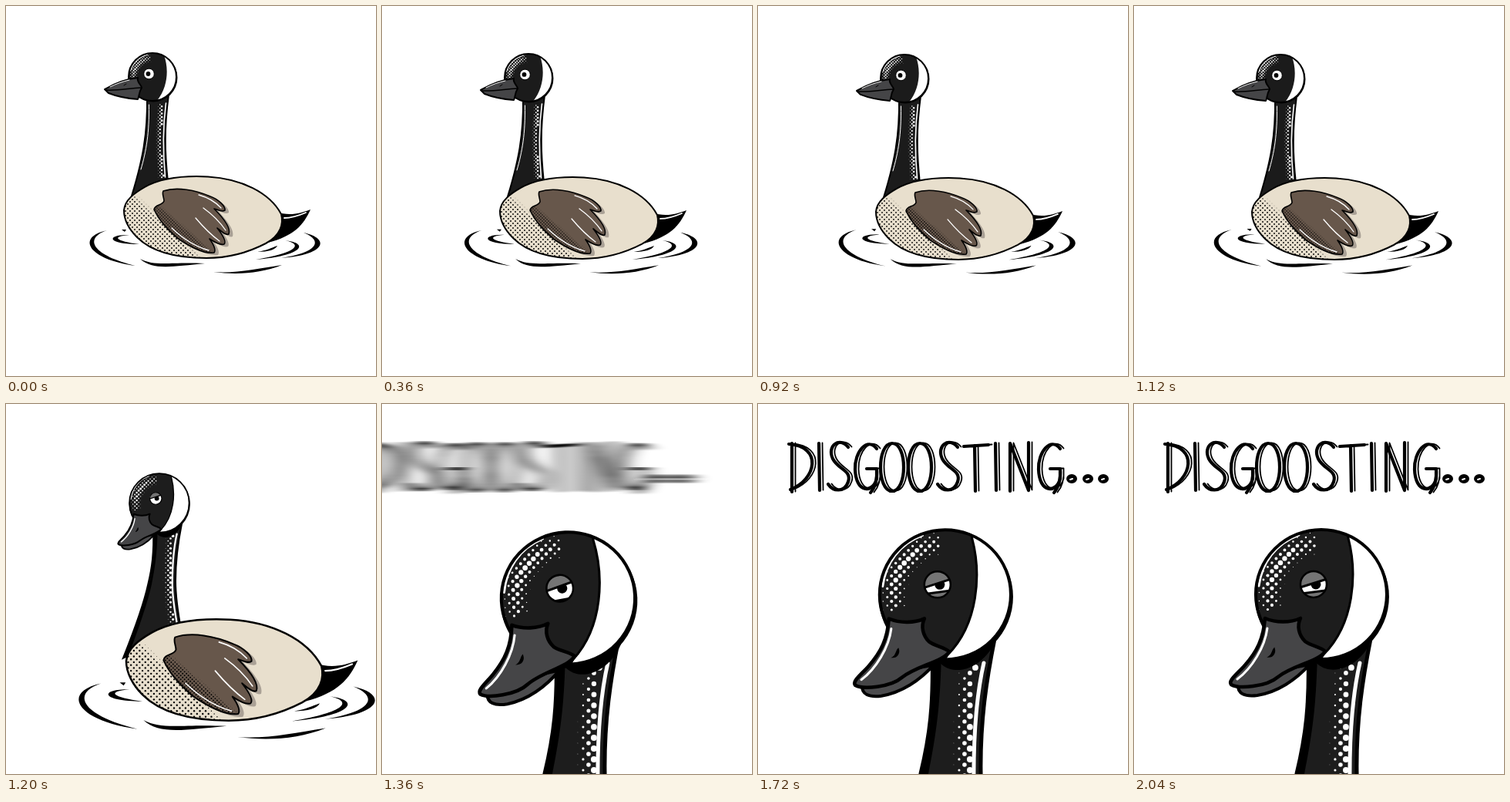
Recreate the animation shown at these times as an HTML page. Size 480 px wide and 480 px high, loop 2320 ms.

```html
<!DOCTYPE html>
<html lang="en">
<head>
<meta charset="utf-8">
<title>Disgoosting</title>
<style>
html, body { margin: 0; width: 100%; height: 100%; overflow: hidden; background: #fff; }
svg { display: block; width: 100%; height: 100%; }
.line { fill: none; stroke: #000; stroke-linecap: round; stroke-linejoin: round; }
.shine { fill: none; stroke: #fff; stroke-linecap: round; }
</style>
</head>
<body>
<svg viewBox="0 0 480 480" role="img" aria-label="A goose on the water turns round: DISGOOSTING...">
<defs>
  <path id="bodyShape" d="M153 265C154 252 166 243 180 235C203 222 232 220 262 221.500C305 224 342 242 357 270C360 282 357 297 337 308C312 321 288 327 260 327C222 327 190 320 170 300C160 290 153 277 153 265Z"/>
  <path id="wingShape" d="M204 240C222 234 246 239 265 247C276 251 285 260 284 265C280 268 275 264 270 263C281 274 292 288 289 296C285 298 279 292 274 288C281 297 286 306 283 309C278 311 270 306 264 302C269 309 273 316 270 320C257 322 238 312 222 301C208 289 197 275 192 264C193 257 203 259 205 253C205 248 202 244 204 240Z"/>
  <path id="frontNeck" d="M226 320C228 390 223 430 211 480C198 540 168 620 140 690L305 610C294 550 289 500 289 470C289 410 296 360 307 305Z"/>
  <path id="sideNeck" d="M183 115C184 165 178 200 160 256L210 228C206 190 205 160 211 115Z"/>
  <clipPath id="bodyClip"><use href="#bodyShape"/></clipPath>
  <clipPath id="wingClip"><use href="#wingShape"/></clipPath>
  <clipPath id="sideClip"><circle cx="190" cy="92" r="31"/></clipPath>
  <clipPath id="frontClip"><ellipse cx="243" cy="247" rx="85" ry="84"/></clipPath>
  <clipPath id="eyeClip"><circle cx="233" cy="234" r="17"/></clipPath>
  <filter id="smear" filterUnits="userSpaceOnUse" x="-700" y="0" width="1400" height="160">
    <feGaussianBlur id="blur" stdDeviation="0 0"/>
  </filter>
</defs>

<g id="camera">
  <g id="ripples">
    <path d="M131 291C99 302 114 324 168 337C107 329 90 300 131 291Z"/>
    <path d="M160 297C136 299 142 305 173 309C129 309 130 296 160 297Z"/>
    <path d="M150 290L156 290L154 293Z"/>
    <path d="M174 328C193 338 210 332 258 334C215 338 190 343 174 328Z"/>
    <path d="M269 345C300 347 325 341 358 336C330 347 300 349 269 345Z"/>
    <path d="M386 294C413 305 403 320 357 327C414 323 422 302 386 294Z"/>
    <path d="M362 304C386 309 378 320 324 329C384 324 395 308 362 304Z"/>
    <path d="M352 311C350 316 340 319 326 319C338 317 344 314 352 311Z"/>
  </g>
  <g id="bird">
    <path d="M350 267C368 273 382 269 395 264C386 284 374 298 340 307Z"/>
    <path class="shine" d="M361 275C372 275 382 271 389 268" stroke-width="1.800"/>

    <g id="side">
      <use href="#sideNeck" fill="#1b1b1b" stroke="#000" stroke-width="2"/>
      <path class="shine" d="M185.500 128C186 165 182 188 175 212" stroke-width="1"/>
      <path class="shine" d="M207.500 126C203 160 203.500 190 206.500 222" stroke-width="1.600"/>
      <g id="sideNeckDots" fill="#fff"/>
      <circle cx="191" cy="93" r="31.500"/>
      <circle cx="190" cy="92" r="31" fill="#fff"/>
      <g clip-path="url(#sideClip)">
        <path d="M205 55V64C211 80 211 105 195 124H155V55Z" fill="#1b1b1b"/>
        <g id="sideDots" fill="#fff"/>
        <path class="shine" d="M161.500 84C165 74 173 66 184 63" stroke-width="1.200"/>
      </g>
      <circle class="line" cx="190" cy="92" r="31" stroke-width="2"/>
      <path d="M128 108C140 101 153 95 171 93C169 98 176 103 176 106C172 112 173 118 171 121C158 120 143 117 133 113Z" fill="#454547" stroke="#000" stroke-width="2" stroke-linejoin="round"/>
      <path class="line" d="M129 109C145 110 158 107 175 106" stroke-width="1.500"/>
      <path class="shine" d="M135 105C143 101 151 98 160 96" stroke-width="1"/>
      <path class="line" d="M153 103L156 101" stroke-width="1"/>
      <circle cx="185.500" cy="88" r="6.800" fill="#fff" stroke="#000"/>
      <circle cx="184.500" cy="88" r="2.900"/>
    </g>

    <g id="front" transform="translate(98.700 9) scale(.366)">
      <use href="#frontNeck" fill="#1d1d1d" stroke="#000" stroke-width="5"/>
      <path d="M226 320C228 390 223 430 211 480C198 540 168 620 140 690L156 680C186 600 210 530 221 480C231 430 237 390 238 320Z"/>
      <path class="shine" d="M293 336C283 380 280 430 280 480C281 530 288 560 293 590" stroke-width="5"/>
      <g id="frontNeckDots" fill="#fff"/>
      <g id="head">
        <path d="M227 318C238 360 290 350 309 305Z"/>
        <ellipse cx="244" cy="250" rx="87" ry="86"/>
        <ellipse cx="243" cy="247" rx="85" ry="84" fill="#fff"/>
        <g clip-path="url(#frontClip)">
          <path d="M278 150V174C290 220 286 285 246 325L236 340H140V150Z" fill="#1d1d1d" stroke="#000" stroke-width="3"/>
          <g id="frontDots" fill="#fff"/>
          <path class="shine" d="M162 236C166 206 184 181 214 170" stroke-width="3"/>
        </g>
        <ellipse class="line" cx="243" cy="247" rx="85" ry="84" stroke-width="4"/>
        <path d="M135 364C134 376 144 380 160 378C186 374 210 358 228 338L190 345Z" fill="#4b4b4d" stroke="#000" stroke-width="4" stroke-linejoin="round"/>
        <path d="M170 278C184 284 203 284 216 278C211 288 214 300 222 308C230 314 242 315 248 321C240 334 206 339 187 354C172 367 136 370 126 364C122 359 133 351 143 340C160 321 168 304 170 278Z" fill="#454547" stroke="#000" stroke-width="4.500" stroke-linejoin="round"/>
        <path class="shine" d="M134 357C153 343 170 315 173 291" stroke-width="3"/>
        <path d="M182 317C184 323 180 328 175 328C180 325 179 320 182 317Z" stroke="#000" stroke-width="1.500"/>
        <g clip-path="url(#eyeClip)">
          <rect x="214" y="215" width="40" height="40" fill="#fff"/>
          <circle cx="236" cy="234" r="6.500"/>
          <path id="upperLid" d="M203 242L263 223V190H203Z" fill="#747474" stroke="#000" stroke-width="3"/>
          <path id="lowerLid" d="M203 248L263 240V275H203Z" fill="#747474" stroke="#000" stroke-width="3"/>
        </g>
        <circle class="line" cx="233" cy="234" r="17" stroke-width="2.500"/>
      </g>
    </g>

    <use href="#bodyShape" fill="#e8dfcd"/>
    <g id="bodyDots" clip-path="url(#bodyClip)"/>
    <use href="#wingShape" fill="#aaa196" transform="translate(5 3)"/>
    <use href="#wingShape" fill="#67574b"/>
    <g id="wingDots" clip-path="url(#wingClip)"/>
    <use href="#wingShape" class="line" stroke-width="1.600"/>
    <path class="shine" d="M250 245Q268 250 279 262M256 262Q274 275 285 291M246 275Q262 294 277 305M215 288Q238 310 263 317" stroke-width="1.300"/>
    <use href="#bodyShape" class="line" stroke-width="2"/>
  </g>
</g>
<g id="title"></g>
</svg>

<script>
const $ = id => document.getElementById(id);
const clamp = v => Math.min(1, Math.max(0, v));
const move = (id, value) => $(id).setAttribute('transform', value);

// Staggered halftone; radius(x, y) sets each dot's size.
function halftone(id, x0, y0, x1, y1, step, radius) {
  let out = '';
  for (let j = 0, y = y0; y < y1; y = y0 + ++j * step / 2)
    for (let x = x0 + j % 2 * step / 2; x < x1; x += step) {
      const r = radius(x, y);
      if (r > 0.2) out += `<circle cx="${x}" cy="${y}" r="${r.toFixed(2)}"/>`;
    }
  $(id).innerHTML = out;
}

const crown = (cx, cy, k) => (x, y) => {
  const dx = (x - cx) / k, dy = (y - cy) / k;
  const turn = Math.cos(Math.atan2(dy, dx) + 2.55);
  return turn < 0.62 ? 0 : k * 3.3 * (1 - Math.abs(Math.hypot(dx, dy) - 67) / 19) * turn;
};
const nape = (edge, k) => (x, y) => {
  const gap = (edge(y) - x) / k;
  return gap < 13 ? 0 : k * (4 - (gap - 13) * 0.17);
};

halftone('frontDots', 157, 162, 250, 285, 11, crown(243, 247, 1));
halftone('sideDots', 158, 61, 195, 106, 3.8, crown(190, 92, 0.37));
halftone('frontNeckDots', 240, 342, 300, 600, 14, nape(y => 288 + 13 * ((y - 450) / 140) ** 2, 1));
halftone('sideNeckDots', 186, 128, 208, 224, 4.6, nape(y => 206.5 + 3 * ((y - 172) / 50) ** 2, 0.37));
halftone('bodyDots', 155, 248, 260, 328, 6, (x, y) => Math.min(0.95, (180 + (y - 250) * 1.05 - x) * 0.07));
halftone('wingDots', 190, 256, 275, 322, 4, (x, y) => Math.min(0.8, (203 + (y - 258) * 1.15 - x) * 0.08));

// Sketchy capitals: every stroke is drawn twice, slightly apart.
const S = 'M117 56C106 42 89 54 97 71C104 85 122 86 117 101C112 116 97 113 91 104';
const G = 'M154 58C142 42 125 62 126 85C127 116 149 116 154 97V84H141M154 84C155 98 152 108 146 115';
const O = 'M174 51C154 51 154 113 174 113C194 113 194 51 174 51';
const I = 'M79 51L80 112';
const letters = [
  ['M44 51V114M40 52C84 55 76 98 42 111', 0], [I, 0], [S, 0], [G, 0], [O, 0], [O, 36],
  [S, 142], ['M267 55L299 53M281 54L282 113', 0], [I, 229], ['M327 113V51L351 112V50', 0], [G, 238]
];
const word = letters.map(([d, x]) => `<path d="${d}" transform="translate(${x})"/>`).join('');
$('title').innerHTML =
  `<g class="line" stroke-width="4.200">${word}</g>` +
  `<g class="line" stroke-width="1.800" transform="translate(4.500 -.5)">${word}</g>` +
  [407, 428, 448].map(x => `<ellipse cx="${x}" cy="97" rx="7" ry="6"/>` +
    `<path class="shine" d="M${x - 2} 98l3-1" stroke-width="2"/>`).join('');

const easeInOut = (p, n) => p < 0.5 ? (2 * p) ** n / 2 : 1 - (2 - 2 * p) ** n / 2;

function draw(t) {
  const zoom = easeInOut(clamp((t - 1120) / 240), 3.15);
  const bump = zoom * (1 - zoom);
  move('camera', `translate(${-269.7 * zoom + 30 * bump} ${-24.6 * zoom + 50 * bump}) scale(${1 + 1.732 * zoom})`);

  const swim = 1 + 0.029 * t / 1000;
  move('ripples', `translate(259 320) scale(${swim}) translate(-259 -320)`);
  move('bird', `translate(0 ${2 * Math.sin(Math.PI / 2 * clamp(t / 1120)) * (1 - zoom)})`);

  const turned = t >= 1160;
  $('side').style.display = turned ? 'none' : '';
  $('front').style.display = turned ? '' : 'none';

  // The head dips as the camera closes in, then recovers.
  const droop = zoom * (1 - clamp((t - 1360) / 600)) ** 3;
  move('head', `translate(${243 - 1.5 * droop} ${246 + 5 * droop}) rotate(${-2.5 * droop}) scale(${1 + 0.02 * droop}) translate(-243 -246)`);
  const open = (1 - clamp((t - 1200) / 400)) ** 2;
  move('upperLid', `translate(0 ${-3 * open})`);
  move('lowerLid', `translate(0 ${14 * open})`);

  const left = 1 - clamp((t - 1220) / 220);
  const speed = 209 * left ** 1.4;
  $('title').style.display = t > 1220 ? '' : 'none';
  move('title', `translate(${-480 * left ** 2.2})`);
  $('blur').setAttribute('stdDeviation', `${speed * 0.22} 0`);
  if (left > 0) $('title').setAttribute('filter', 'url(#smear)');
  else $('title').removeAttribute('filter');
}

function tick() {
  draw(Math.floor(performance.now() % 2320 / 40) * 40);
  requestAnimationFrame(tick);
}
tick();
</script>
</body>
</html>
```
